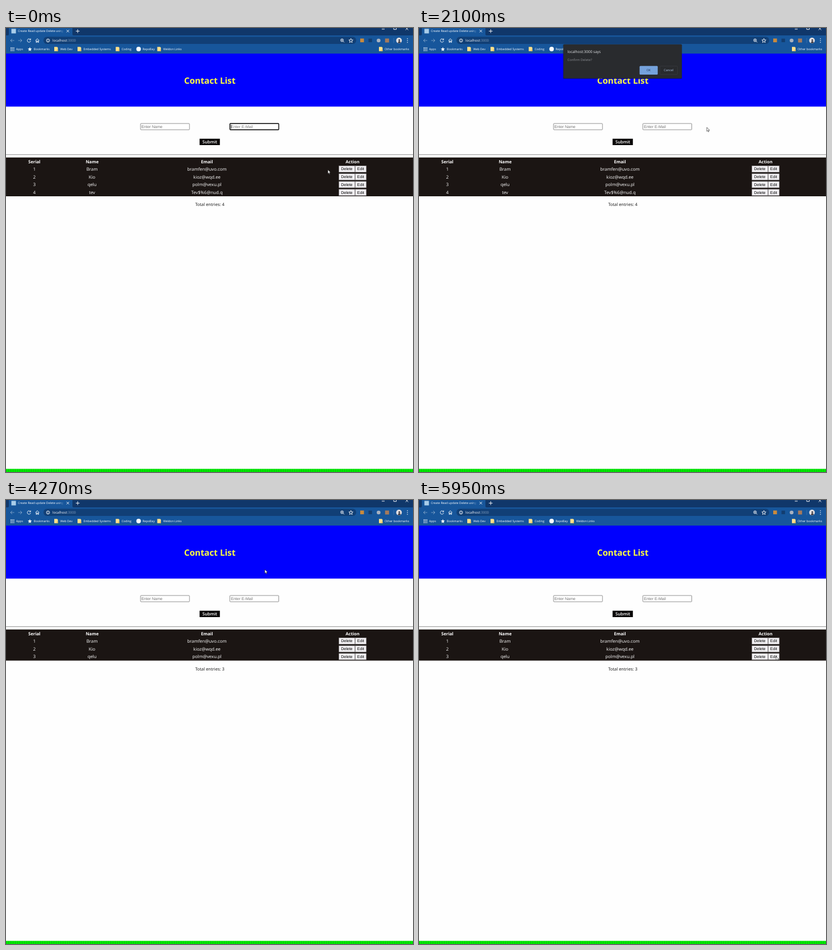
Recreate the animation shown at these times as an HTML page. Size 717 px wide and 781 px high, loop 6.02 s.

```html
<!DOCTYPE html>
<html lang="en">
<head>
<meta charset="utf-8">
<title>Contact List</title>
<style>
  html, body { margin: 0; width: 100%; height: 100%; overflow: hidden; background: #fefefe; }
  svg { display: block; }
  text { font-family: "Open Sans", "Noto Sans", sans-serif; text-rendering: geometricPrecision; white-space: pre; }
  .ui { font-size: 5.25px; fill: #fff; }
  .url { font-size: 6.1px; fill: #fff; }
  .line { fill: none; stroke: #fff; stroke-width: .9; }
  .mid { text-anchor: middle; }
  .cell { font-size: 7.8px; fill: #fff; text-anchor: middle; }
  .head { font-size: 7.6px; font-weight: 700; }
  .form { font-family: "Liberation Sans", Arial, sans-serif; font-size: 7px; }
  .hint { fill: #757575; }
  .total { font-size: 7.55px; fill: #111; text-anchor: middle; }

  .cursor, .dialog, .focus, .caret, .before, .after { animation: 6020ms infinite; }
  .cursor { animation-name: point; animation-timing-function: ease-in-out; }
  .dialog { animation-name: ask; animation-timing-function: linear; }
  .focus { animation-name: blur; animation-timing-function: step-end; }
  .caret { animation-name: blink; animation-timing-function: step-end; }
  .before { animation-name: remove; animation-timing-function: step-end; }
  .after { animation-name: settle; animation-timing-function: step-end; }

  @keyframes point {
    0%, 9.3% { transform: translate(567px, 249.3px); }
    18.6%, 26% { transform: translate(598.5px, 242.5px); animation-timing-function: ease-in; }
    34.9% { transform: translate(507px, 174.7px); animation-timing-function: ease-out; }
    48%, 65.5% { transform: translate(415px, 73px); }
    80.2% { transform: translate(558px, 245px); }
    97.7%, 100% { transform: translate(629px, 275px); }
  }
  @keyframes ask {
    0%, 22.1% { opacity: 0; transform: translateY(-13px); }
    26%, 62.2% { opacity: 1; transform: none; }
    66.2%, 100% { opacity: 0; transform: translateY(-10px); }
  }
  @keyframes blur { 0% { opacity: 1; } 22.1%, 100% { opacity: 0; } }
  @keyframes blink { 0%, 17.6% { opacity: 1; } 8.8%, 22.1%, 100% { opacity: 0; } }
  @keyframes remove { 0% { opacity: 1; } 62.8%, 100% { opacity: 0; } }
  @keyframes settle { 0% { opacity: 0; } 62.8%, 100% { opacity: 1; } }
</style>
</head>
<body>
<svg width="717" height="781" viewBox="0 0 717 781">
  <defs>
    <g id="folder">
      <path d="M0 0h5l1.4 1.4V7.6H0z" fill="#ffe08a"/>
      <path d="M4.4 5h2v2.6h-2z" fill="#e8bd55"/>
    </g>
    <path id="star" d="M0-3.6l1 2.5 2.7.2-2.1 1.7.7 2.7L0 2 -2.3 3.5l.7-2.7-2.1-1.7 2.7-.2z"/>
    <g id="actions">
      <path d="M586.5-5.5h28.2v11h-28.2zM615.2-5.5h19.5v11h-19.5z" fill="#f2f0f3" stroke="#8a8789" stroke-width=".7"/>
      <text class="form mid" x="600.4" y="2.4">Delete</text>
      <text class="form mid" x="624.9" y="2.4">Edit</text>
    </g>
    <pattern id="ticks" width="4" height="6" patternUnits="userSpaceOnUse">
      <path d="M0 0h4v6H0z" fill="#00e800"/>
      <path d="M0 0h1v6H0z" fill="#00c808"/>
    </pattern>
    <linearGradient id="fade"><stop stop-color="#17569b" stop-opacity="0"/><stop offset="1" stop-color="#17569b"/></linearGradient>
  </defs>

  <!-- Browser window -->
  <path d="M0 0h717v14H0z" fill="#10376a"/>
  <path d="M0 13h717v32H0z" fill="#17569b"/>
  <path d="M3 13q2 0 2-2V0h112v11q0 2 2 2z" fill="#17569b"/>
  <rect x="9.5" y="1.5" width="8" height="8" fill="#a9cdea"/>
  <text class="ui" x="21" y="7.4">Create Read update Delete using</text>
  <path d="M93 0h9v11h-9z" fill="url(#fade)"/>
  <path class="line" d="M106.7 3.2l4.4 4.4m0-4.4l-4.4 4.4M123 5.5h6.6m-3.3-3.3v6.6M662 2h5M683-2h4.6v4.6H683zM704-1l4.6 4.6m0-4.6L704 3.6"/>
  <rect x="66" y="15.5" width="551" height="12.6" rx="6.3" fill="#113f76"/>
  <path class="line" opacity=".45" d="M14.5 22H8m3-3l-3 3 3 3M21.5 22H28m-3-3l3 3-3 3"/>
  <path class="line" d="M42.7 20a3 3 0 1 0 .7 2.8M43.4 18.5v2.3h-2.3M52 22l3.2-3.2 3.2 3.2M53 21.5v3.7h1.5v-2.4H56v2.4h1.5v-3.7"/>
  <g class="line" stroke-width=".7">
    <circle cx="74" cy="22" r="2.8"/>
    <path d="M74 21.5v2.2M74 20v.7"/>
    <circle cx="592" cy="21.5" r="2.5"/>
    <path d="M593.8 23.3l2 2M590.8 21.5h2.4M592 20.3v2.4"/>
    <use href="#star" x="607.6" y="22"/>
  </g>
  <text class="url" x="82" y="24.2">localhost<tspan fill="#86a0bf">:3000</tspan></text>
  <rect x="624" y="18.5" width="6.6" height="6.6" fill="#c98a3c"/>
  <rect x="638.6" y="18.7" width="6.2" height="6.2" fill="#123d70"/>
  <circle cx="656.4" cy="22" r="3.3" fill="#a8b2c0"/>
  <rect x="667.8" y="18.5" width="7" height="7" fill="#a67a5c"/>
  <path d="M683 17.5v9" stroke="#4079b5" stroke-width=".7"/>
  <circle cx="692.3" cy="22" r="5" fill="#e3e0e2"/>
  <path d="M690.5 26.6q.2-3.6 2.4-3.6t2.5 2.8q-2.2 1.6-4.9.8z" fill="#3d3b45"/>
  <circle cx="692.9" cy="21.3" r="1.5" fill="#3d3b45"/>
  <path d="M707.2 18.7v.01M707.2 22v.01M707.2 25.3v.01" stroke="#fff" stroke-width="1.5" stroke-linecap="round"/>

  <!-- Bookmarks -->
  <path d="M8 34.7h7M8 37.2h7M8 39.7h7" stroke="#e4edf6" stroke-width="1.5" stroke-dasharray="1.5 1"/>
  <use href="#star" x="42" y="37.2" fill="#fff"/>
  <use href="#folder" x="85" y="33.2"/>
  <use href="#folder" x="126" y="33.2"/>
  <use href="#folder" x="193.3" y="33.2"/>
  <circle cx="233.6" cy="37" r="4" fill="#fff"/>
  <use href="#folder" x="266.5" y="33.2"/>
  <use href="#folder" x="657" y="33.2"/>
  <g class="ui">
    <text x="17.7" y="39">Apps</text>
    <text x="49" y="39">Bookmarks</text>
    <text x="95.5" y="39">Web Dev</text>
    <text x="136.5" y="39">Embedded Systems</text>
    <text x="203.7" y="39">Coding</text>
    <text x="240.5" y="39">RepoBay</text>
    <text x="277" y="39">Weldon Links</text>
    <text x="667" y="39">Other bookmarks</text>
  </g>

  <!-- Page -->
  <path d="M0 45h717v93.3H0z" fill="#0000fe"/>
  <text class="mid" x="359" y="98.4" font-size="15.2" font-weight="700" fill="#ffff40">Contact List</text>
  <rect x="237" y="168" width="86.2" height="11" rx="1" fill="#fff" stroke="#858585" stroke-width=".9"/>
  <rect x="394.3" y="168" width="86.2" height="11" rx="1" fill="#fff" stroke="#858585" stroke-width=".9"/>
  <text class="form hint" x="238.4" y="176">Enter Name</text>
  <text class="form hint" x="396.3" y="176">Enter E-Mail</text>
  <rect class="focus" x="394.5" y="168" width="86" height="11" rx="1" fill="none" stroke="#111" stroke-width="1.5"/>
  <path class="caret" d="M396.6 170v7.5" stroke="#222" stroke-width=".8"/>
  <path d="M341 194.7h35.8V206H341z" fill="#0a0808"/>
  <text class="mid" x="359" y="203" font-size="7.6" font-weight="600" fill="#fff">Submit</text>
  <path d="M0 222.6h717" stroke="#a5a5a5" stroke-width="1.2"/>

  <path d="M0 227.8h717v54.6H0z" fill="#1b1513"/>
  <g class="cell head">
    <text x="50" y="237.7">Serial</text>
    <text x="151.8" y="237.7">Name</text>
    <text x="354" y="237.7">Email</text>
    <text x="610.5" y="237.7">Action</text>
  </g>
  <g transform="translate(0 248)">
    <text class="cell" x="50" y="2.8">1</text>
    <text class="cell" x="151.6" y="2.8">Bram</text>
    <text class="cell" x="354" y="2.8">bramfen@uvo.com</text>
    <use href="#actions"/>
  </g>
  <g transform="translate(0 261.8)">
    <text class="cell" x="50" y="2.8">2</text>
    <text class="cell" x="151.6" y="2.8">Kio</text>
    <text class="cell" x="354" y="2.8">kioz@wqd.ee</text>
    <use href="#actions"/>
  </g>
  <g transform="translate(0 275.4)">
    <text class="cell" x="50" y="2.8">3</text>
    <text class="cell" x="151.6" y="2.8">qelu</text>
    <text class="cell" x="354" y="2.8">polm@vexu.pl</text>
    <use href="#actions"/>
  </g>
  <g class="before">
    <path d="M0 282h717v14H0z" fill="#1b1513"/>
    <g transform="translate(0 289.2)">
      <text class="cell" x="50" y="2.8">4</text>
      <text class="cell" x="151.6" y="2.8">tev</text>
      <text class="cell" x="354" y="2.8">Tev$%6@nud.q</text>
      <use href="#actions"/>
    </g>
    <text class="total" x="359" y="313.2">Total entries: 4</text>
  </g>
  <text class="total after" x="359" y="299.5">Total entries: 3</text>
  <path d="M0 775.5h717V781H0z" fill="url(#ticks)"/>

  <!-- Confirmation -->
  <g class="dialog">
    <rect x="253.5" y="28.5" width="210" height="61.5" rx="2" fill="#000" opacity=".25"/>
    <rect x="254.3" y="28.8" width="208.7" height="60" rx="1.5" fill="#292b2e"/>
    <text x="261.6" y="44.3" font-size="6.5" fill="#e8eaed">localhost:3000 says</text>
    <text x="261.6" y="57.7" font-size="5.75" fill="#8d9094">Confirm Delete?</text>
    <rect x="388.6" y="66.8" width="32" height="15.2" rx="1.5" fill="#75a2dc"/>
    <rect x="424.3" y="67" width="31" height="14.8" rx="1.5" fill="none" stroke="#3b3e43" stroke-width=".7"/>
    <text class="mid" x="404.4" y="76.3" font-size="5.4" fill="#20354f">OK</text>
    <text class="mid" x="439.8" y="76.3" font-size="5.5" fill="#a9c2e2">Cancel</text>
  </g>

  <path class="cursor" d="M0 0v7l1.6-1.4 1.1 2.3 1.1-.5-1.1-2.3H5z" fill="#fff" stroke="#111" stroke-width=".6"/>
</svg>
</body>
</html>
```
